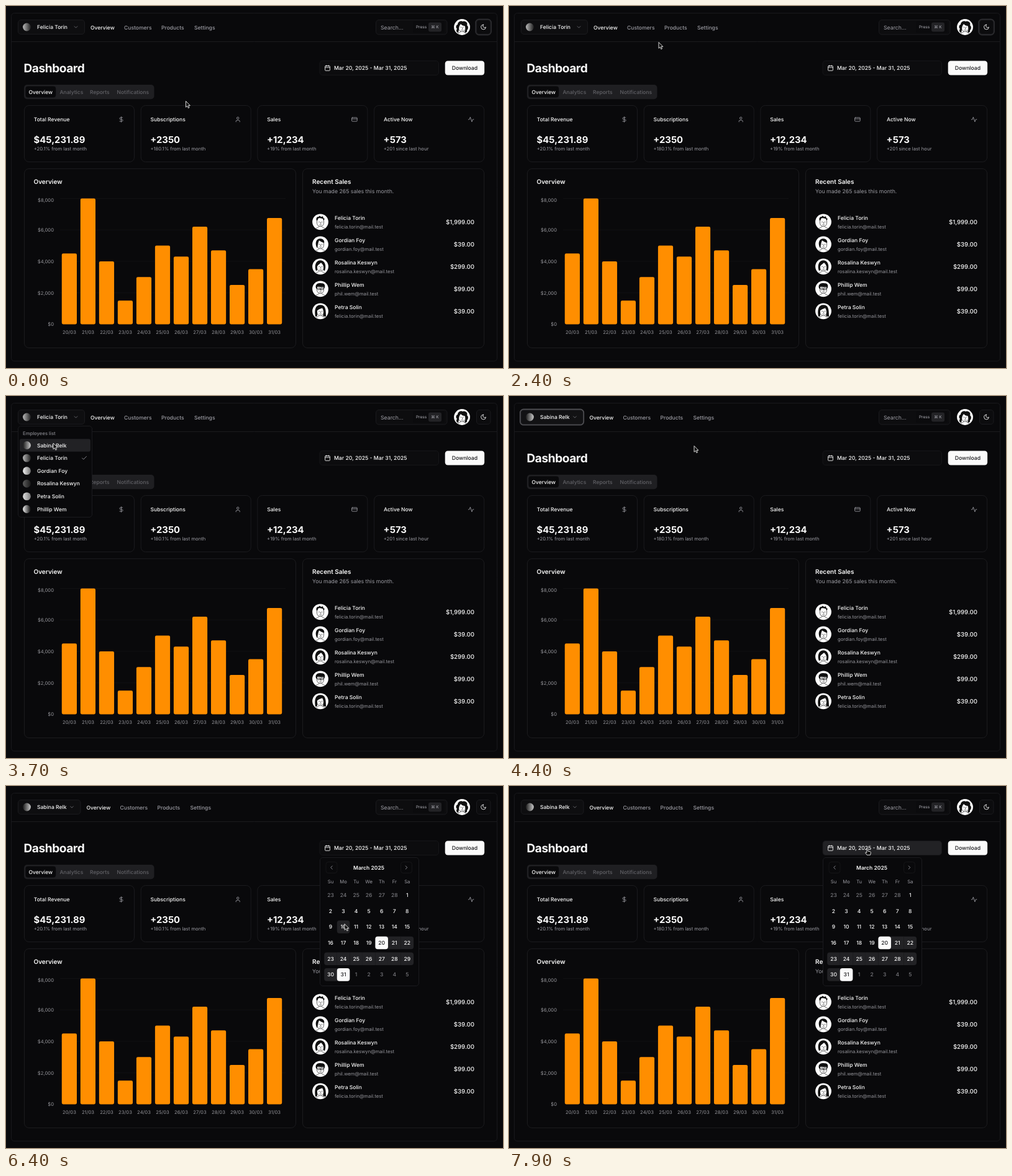
Animation, 800 px wide and 584 px high, one loop 8000 ms. Source, as an HTML page with a canvas:

```html
<!DOCTYPE html>
<html lang="en">
<head>
<meta charset="utf-8">
<title>Dashboard</title>
<style>
  html, body { margin: 0; width: 100%; height: 100%; overflow: hidden; background: #09090b; }
  canvas { display: block; }
</style>
</head>
<body>
<canvas id="stage" width="800" height="584"></canvas>
<script>
const ctx = document.getElementById('stage').getContext('2d');
ctx.textRendering = 'geometricPrecision';

const LOOP = 8000;
const BG = '#09090b', WHITE = '#fafafa', GRAY = '#9c9ca3', LINE = '#1b1b1e', ACCENT = '#222225';
const TEXT = 8.55, SMALL = 7.68;

const ICON = {
  dollar: 'M12 2v20M17 5H9.5a3.5 3.5 0 0 0 0 7h5a3.5 3.5 0 0 1 0 7H6',
  user: 'M19 21v-2a4 4 0 0 0-4-4H9a4 4 0 0 0-4 4v2M8 7a4 4 0 1 0 8 0a4 4 0 1 0-8 0',
  card: 'M4 5h16a2 2 0 0 1 2 2v10a2 2 0 0 1-2 2H4a2 2 0 0 1-2-2V7a2 2 0 0 1 2-2zM2 10h20',
  pulse: 'M22 12h-4l-3 9L9 3l-3 9H2',
  calendar: 'M5 4h14a2 2 0 0 1 2 2v14a2 2 0 0 1-2 2H5a2 2 0 0 1-2-2V6a2 2 0 0 1 2-2zM16 2v4M8 2v4M3 10h18',
  moon: 'M12 3a6 6 0 0 0 9 9 9 9 0 1 1-9-9Z',
  down: 'M6 9l6 6 6-6',
  left: 'M15 18l-6-6 6-6',
  right: 'M9 18l6-6-6-6',
  check: 'M20 6L9 17l-5-5'
};

const CURSOR = {
  arrow: 'M0 0V9.8L2.3 7.7L3.9 11.2L5.5 10.4L4 7.1H6.9Z',
  hand: 'M-1.2 0C-1.2-1.3.7-1.3.7 0V3.6L4.3 4.3Q5.6 4.7 5.4 6.2L4.6 9.8H-.8L-3.2 6.6C-3.6 5.5-2.6 5-1.2 6.2Z'
};

const HAIR = [
  'M-6-2C-8-7-4-9-3-8L-1-10L1-8L4-9L5-6L7-5L5-2L4-5L0-6L-3-6L-5-2Z',
  'M-6 5C-9-2-7-9 0-9C5-9 7-5 6-2C2-3 0-5-2-6C-4-2-4 2-5 6Z',
  'M-7 7C-10 0-8-10 0-10S10 0 7 7L5 6C6 0 4-4 1-6C-1-4-4-3-5 0L-5 6Z',
  'M-7-1C-9-7-4-10 1-9C7-10 9-5 6 0L5-3C0-2-3-4-5-3L-5 1Z',
  'M-8 9C-10-2-8-10 0-10S9-4 9 9L4 8C6 3 5-2 3-5L-2-3L-5-1V8Z',
  'M-6 9C-9 9-10 5-8 3C-11 0-9-4-7-4C-7-9-1-11 1-9C6-11 10-6 8-3C11-1 10 4 8 5C9 8 6 10 4 8C6 4 6 0 4-2C1-2-1-4-2-5C-4-3-5 0-5 4Z'
];

const people = [
  ['Felicia Torin', 'felicia.torin@mail.test', '$1,999.00'],
  ['Gordian Foy', 'gordian.foy@mail.test', '$39.00'],
  ['Rosalina Keswyn', 'rosalina.keswyn@mail.test', '$299.00'],
  ['Phillip Wem', 'phil.wem@mail.test', '$99.00'],
  ['Petra Solin', 'felicia.torin@mail.test', '$39.00']
].map(([name, email, amount]) => ({ name, email, amount }));

// name, left and right tone of the round badge
const employees = [
  ['Sabina Relk', '#222222', '#c4c4c4'],
  [people[0].name, '#b5b5b5', '#262626'],
  [people[1].name, '#eeeeee', '#777777'],
  [people[2].name, '#5a5a5a', '#1c1c1c'],
  [people[4].name, '#dddddd', '#808080'],
  [people[3].name, '#e8e8e8', '#111111']
];

const stats = [
  ['Total Revenue', '$45,231.89', '+20.1% from last month', 'dollar'],
  ['Subscriptions', '+2350', '+180.1% from last month', 'user'],
  ['Sales', '+12,234', '+19% from last month', 'card'],
  ['Active Now', '+573', '+201 since last hour', 'pulse']
];

const sales = [4500, 8000, 4000, 1500, 3000, 5000, 4300, 6200, 4700, 2500, 3500, 6750];

// time, x, y of the pointer tip
const route = [
  [0, 289.5, 153.5], [350, 300, 140], [1050, 642, 42], [1400, 630, 40], [1650, 625, 41],
  [2400, 241, 58.5], [2850, 80, 38], [3050, 82, 37], [3300, 95.5, 48.5], [3700, 76, 76],
  [4100, 74, 80], [4400, 298, 80.5], [5200, 570, 101], [5450, 576, 103], [5800, 590, 190],
  [6400, 545, 222.5], [6700, 556, 238], [7300, 577, 101.5], [LOOP, 577, 101.5]
];

function pointerAt(t) {
  const i = route.findIndex(stop => stop[0] > t);
  const [t0, x0, y0] = route[i - 1], [t1, x1, y1] = route[i];
  const u = (t - t0) / (t1 - t0), k = u * u * (3 - 2 * u);
  return { x: x0 + (x1 - x0) * k, y: y0 + (y1 - y0) * k };
}

const inside = (p, x, y, w, h) => p.x >= x && p.x < x + w && p.y >= y && p.y < y + h;

function box(x, y, w, h, r, fill, stroke, width = 1) {
  ctx.beginPath();
  ctx.roundRect(x, y, w, h, r);
  if (fill) { ctx.fillStyle = fill; ctx.fill(); }
  if (stroke) { ctx.strokeStyle = stroke; ctx.lineWidth = width; ctx.stroke(); }
}

// y is the middle of the capitals
function text(str, x, y, size = TEXT, color = WHITE, weight = 500, align = 'left') {
  ctx.font = `${weight} ${size}px Inter, "DejaVu Sans", sans-serif`;
  ctx.fillStyle = color;
  ctx.textAlign = align;
  ctx.fillText(str, x, y + size * 0.364);
}

function line(x0, y0, x1, y1, color) {
  ctx.strokeStyle = color;
  ctx.lineWidth = 1;
  ctx.beginPath();
  ctx.moveTo(x0, y0);
  ctx.lineTo(x1, y1);
  ctx.stroke();
}

function icon(name, x, y, color = GRAY, size = 10.3) {
  ctx.save();
  ctx.translate(x - size / 2, y - size / 2);
  ctx.scale(size / 24, size / 24);
  ctx.strokeStyle = color;
  ctx.lineWidth = 2;
  ctx.lineCap = ctx.lineJoin = 'round';
  ctx.stroke(new Path2D(ICON[name]));
  ctx.restore();
}

function disc(x, y, r, fill) {
  ctx.fillStyle = fill;
  ctx.beginPath();
  ctx.arc(x, y, r, 0, 2 * Math.PI);
  ctx.fill();
}

function badge(x, y, from, to) {
  const tone = ctx.createLinearGradient(x - 6, y, x + 6, y);
  tone.addColorStop(0, from);
  tone.addColorStop(1, to);
  disc(x, y, 6.4, tone);
}

function avatar(x, y, kind) {
  ctx.save();
  ctx.translate(x, y);
  disc(0, 0, 12.9, '#fff');
  ctx.clip();
  ctx.strokeStyle = '#111';
  ctx.lineWidth = 0.65;
  ctx.stroke(new Path2D('M-5.5-3V2C-5 9 5 9 5.5 2V-3M-9 13C-8 9-3 10-2 7M2 7C3 10 8 9 9 13M0 0L1 2.5H0M-1.5 4.5Q.5 5.5 2 4.3'));
  disc(-2, 0, 0.6, '#111');
  disc(2.7, 0, 0.6, '#111');
  ctx.fill(new Path2D(HAIR[kind]));
  if (kind === 3) ctx.stroke(new Path2D('M-4-1.5H-.5V1.5H-4ZM1-1.5H4.5V1.5H1ZM-.5 0H1'));
  ctx.restore();
}

function drawHeader(t, pointer, picked) {
  const [name, from, to] = employees[picked ? 0 : 1];
  const shift = picked ? -6.5 : 0;
  const focused = picked && t < 5400;
  box(19.5, 22.5, 107 + shift, 23, 4.5, focused ? '#121214' : '#0e0e10', LINE);
  if (focused) box(18, 21.5, 102.2, 25.2, 5.5, null, '#4c4c50', 1.8);
  badge(33.5, 34, from, to);
  text(name, 50, 34);
  icon('down', 112.5 + shift, 34, '#7a7a80', 9.5);

  [['Overview', 136], ['Customers', 190], ['Products', 250], ['Settings', 303]].forEach(([label, x], i) =>
    text(label, x + shift, 34.5, TEXT, i ? GRAY : WHITE));

  const hover = inside(pointer, 595, 22, 115, 24);
  box(595.5, 22.5, 114.5, 23.5, 4.5, hover ? ACCENT : '#0d0d0f', LINE);
  text('Search...', 603, 34.5, 8.75, GRAY, 400);
  box(655, 24, 51, 20, 4, hover ? BG : '#0b0b0d');
  text('Press', 660, 34, 6.4, GRAY);
  box(680, 26.5, 21, 15, 3, '#232326');
  text('⌘ K', 690.5, 34, 6.4, GRAY, 500, 'center');
  avatar(734, 34, 5);
  box(757.5, 22.5, 22.5, 23, 4.5, '#0c0c0e', LINE);
  if (t < 3000) box(756, 21.5, 25, 25, 5.5, null, '#2b2b2e', 1.8);
  icon('moon', 768.5, 34, WHITE);
}

function drawTitle(pointer) {
  ctx.letterSpacing = '-0.45px';
  text('Dashboard', 28.5, 100.5, 19.1, WHITE, 700);
  ctx.letterSpacing = '0px';
  box(505, 88.5, 191.5, 23, 4.5, inside(pointer, 505, 88, 192, 23) ? ACCENT : '#0c0c0e', '#161619');
  icon('calendar', 517.5, 100, WHITE);
  text('Mar 20, 2025 - Mar 31, 2025', 528, 100, 8.65);
  box(706.7, 88.4, 63.4, 23.2, 4.5, WHITE);
  text('Download', 738.4, 100, 8.65, '#18181b', 500, 'center');

  box(29, 127, 209.5, 23.2, 5, '#1f1f22');
  box(31.5, 129.6, 48.7, 18, 4, BG);
  [['Overview', 36.5], ['Analytics', 86.5], ['Reports', 135], ['Notifications', 178.5]].forEach(([label, x], i) =>
    text(label, x, 139, 8.5, i ? '#626267' : WHITE));
}

function drawStats() {
  stats.forEach(([label, value, note, glyph], i) => {
    const x = 29.5 + i * 187.7;
    box(x, 160.5, 177, 91, 7.5, null, LINE);
    text(label, x + 15.3, 183);
    icon(glyph, x + 156, 183);
    text(value, x + 15, 215.5, 14.85, WHITE, 700);
    text(note, x + 15.2, 230, SMALL, GRAY, 400);
  });
}

function drawChart() {
  box(29.5, 262.5, 437, 289, 7.5, null, LINE);
  text('Overview', 44.5, 283, 10, WHITE, 600);
  ['$8,000', '$6,000', '$4,000', '$2,000', '$0'].forEach((label, i) => {
    const y = 310.5 + i * 50.75;
    if (i < 4) line(87, y, 450, y, '#111113');
    text(label, 77, y + (i ? 0.2 : 2.5), SMALL, '#95959a', 400, 'right');
  });
  sales.forEach((value, i) => {
    const height = value * 203 / 8000;
    box(89.8 + i * 30.02, 513.4 - height, 24.2, height, 2.3, '#ff8e00');
    text(`${20 + i}/03`, 102 + i * 30, 526, SMALL, '#95959a', 400, 'center');
  });
}

function drawSales() {
  box(477.5, 262.5, 292, 289, 7.5, null, LINE);
  text('Recent Sales', 493, 283, 10, WHITE, 600);
  text('You made 265 sales this month.', 493, 298.5, 8.72, GRAY, 400);
  people.forEach(({ name, email, amount }, i) => {
    const y = 348.3 + i * 36;
    avatar(506, y, i);
    text(name, 529, y - 6.3);
    text(email, 529, y + 7.5, SMALL, '#95959b', 400);
    text(amount, 754, y + 0.5, 9.65, WHITE, 500, 'right');
  });
}

function drawMenu(active) {
  box(19.5, 48.5, 119, 147, 4.5, BG, LINE);
  text('Employees list', 27, 60.2, SMALL, '#88888e');
  employees.forEach(([name, from, to], i) => {
    const y = 79.5 + i * 20.6;
    if (i === active) box(22, y - 10.2, 114, 20.4, 3, ACCENT);
    badge(33.5, y, from, to);
    text(name, 50, y);
    if (i === 1) icon('check', 126, y, GRAY);
  });
}

function drawCalendar(pointer) {
  const column = i => 522.5 + i * 20.55;
  box(505.5, 115.5, 159, 207, 4.5, BG, LINE);
  text('March 2025', 584, 131.7, TEXT, WHITE, 600, 'center');
  [['left', 524], ['right', 644.5]].forEach(([name, x]) => {
    box(x - 9, 122.5, 18, 18, 4, null, '#151517');
    icon(name, x, 131.5);
  });
  ['Su', 'Mo', 'Tu', 'We', 'Th', 'Fr', 'Sa'].forEach((day, i) =>
    text(day, column(i), 154.3, SMALL, GRAY, 400, 'center'));

  for (let i = 0; i < 42; i++) {
    const date = new Date(2025, 1, 23 + i), day = date.getDate();
    const current = date.getMonth() === 2;
    const col = i % 7, x = column(col), y = 176 + Math.floor(i / 7) * 25.67;
    const ranged = current && day >= 20, end = current && (day === 20 || day === 31);
    const cell = [x - 10.3, y - 10.3, 20.6, 20.6];
    if (ranged) {
      const l = col === 0 || day === 20 ? 4 : 0, r = col === 6 || day === 31 ? 4 : 0;
      box(...cell, [l, r, r, l], ACCENT);
    } else if (inside(pointer, ...cell)) box(...cell, 4, ACCENT);
    if (end) box(...cell, 4, WHITE);
    text(day, x, y, TEXT, end ? '#18181b' : current ? WHITE : '#77777c', 500, 'center');
  }
}

function drawPointer({ x, y }, kind) {
  ctx.save();
  ctx.translate(x, y);
  ctx.lineJoin = 'round';
  ctx.strokeStyle = '#f0f0f0';
  if (kind === 'beam') {
    ctx.lineWidth = 1.2;
    ctx.stroke(new Path2D('M-2.5-5.5Q0-5.5 0-3.5Q0-5.5 2.5-5.5M0-4V4M-2.5 5.5Q0 5.5 0 3.5Q0 5.5 2.5 5.5M-1.5 1.5H1.5'));
  } else {
    const shape = new Path2D(CURSOR[kind]);
    ctx.fillStyle = '#0b0b0b';
    ctx.fill(shape);
    ctx.lineWidth = 0.9;
    ctx.stroke(shape);
  }
  ctx.restore();
}

function draw(t) {
  const pointer = pointerAt(t);
  const picked = t >= 4100;
  const menuOpen = t >= 3000 && !picked;

  ctx.fillStyle = BG;
  ctx.fillRect(0, 0, 800, 584);
  box(8.5, 11.5, 782, 561.5, 5, null, '#19191c');
  line(9, 57.5, 790, 57.5, LINE);

  drawHeader(t, pointer, picked);
  drawTitle(pointer);
  drawStats();
  drawChart();
  drawSales();
  if (menuOpen) drawMenu(t < 3700 ? 1 : 0);
  if (t >= 5400) drawCalendar(pointer);

  const onButton = inside(pointer, 19, 22, 108, 24) || inside(pointer, 505, 88, 192, 23);
  drawPointer(pointer, inside(pointer, 595, 22, 115, 24) ? 'beam' : onButton ? 'hand' : 'arrow');
}

function tick() {
  draw(performance.now() % LOOP);
  requestAnimationFrame(tick);
}
tick();
</script>
</body>
</html>
```
